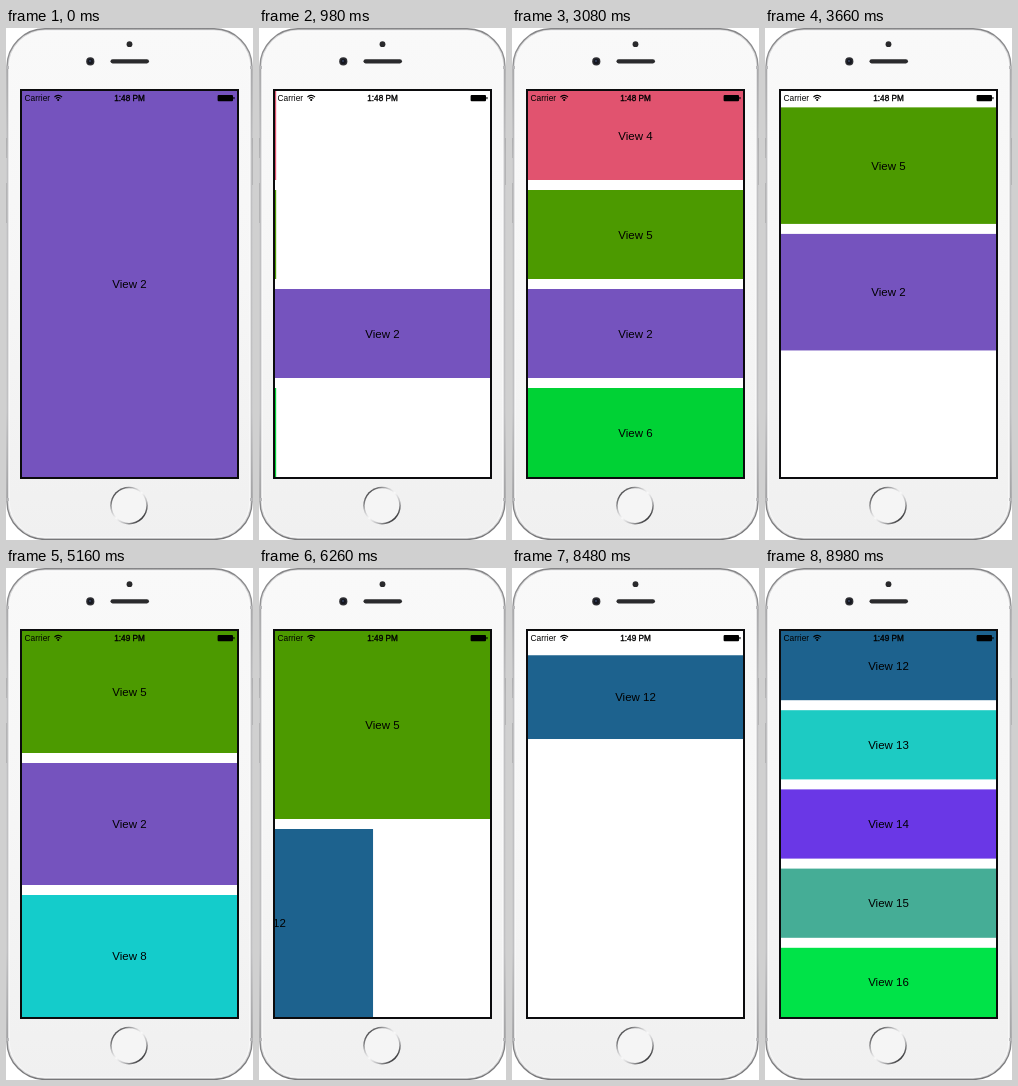
Write an HTML page with a canvas that moves like this. It is 247 px wide and 512 px high and loops after 9800 ms.

```html
<!DOCTYPE html>
<html lang="en">
<head>
<meta charset="utf-8">
<title>Stack view</title>
<style>
html, body { margin: 0; width: 100%; height: 100%; overflow: hidden; background: #fff; }
canvas { display: block; }
</style>
</head>
<body>
<canvas id="stage" width="247" height="512"></canvas>
<script>
const ctx = document.getElementById('stage').getContext('2d');
const LOOP = 9800;
const SCREEN = { x: 16, y: 63, w: 215, h: 386 };
const GAP = 10;
const STAGE = 400, MOVE_DELAY = 200, IN_DELAY = 600;
const FONT = '"Liberation Sans", Arial, sans-serif';

const COLORS = {
  2: '#7553be', 4: '#e1536f', 5: '#4c9a00', 6: '#00d235', 8: '#14cccb',
  12: '#1d628e', 13: '#1dcbc3', 14: '#6a37e6', 15: '#45ad96', 16: '#00e348'
};

// Each stack of views and the time its transition begins.
const STACKS = [
  { at: 0, views: [2] },
  { at: 360, views: [4, 5, 2, 6] },
  { at: 3176, views: [5, 2, 8] },
  { at: 5470, views: [5, 12] },
  { at: 7980, views: [12, 13, 14, 15, 16] }
];
const CLOCK_TICK = 4500;

const clamp = v => Math.max(0, Math.min(1, v));
const lerp = (a, b, p) => a + (b - a) * p;
function ease(v) {
  const t = clamp(v);
  return t < 0.5 ? 2 * t * t : 1 - 2 * (1 - t) * (1 - t);
}

function slot(views, id) {
  const n = views.length;
  const h = (SCREEN.h - GAP * (n - 1)) / n;
  return { y: SCREEN.y + views.indexOf(id) * (h + GAP), h };
}

function text(str, x, y, size, align = 'center') {
  ctx.font = `${size}px ${FONT}`;
  ctx.textAlign = align;
  ctx.textBaseline = 'alphabetic';
  ctx.fillStyle = '#000';
  ctx.fillText(str, x, y);
}

function panel(id, dx, y, h) {
  ctx.fillStyle = COLORS[id];
  ctx.fillRect(SCREEN.x + dx, y, SCREEN.w, h);
  text('View ' + id, SCREEN.x + SCREEN.w / 2 + dx, y + h / 2 + 4, 11.5);
}

function drawViews(t) {
  let i = STACKS.length - 1;
  while (i > 0 && t < STACKS[i].at) i--;
  const now = STACKS[i].views;
  const old = i ? STACKS[i - 1].views : now;
  const dt = t - STACKS[i].at;
  const out = ease(dt / STAGE);
  const move = ease((dt - MOVE_DELAY) / STAGE);
  const enter = ease((dt - IN_DELAY) / STAGE);

  for (const id of old.filter(v => !now.includes(v))) {
    const s = slot(old, id);
    if (out < 1) panel(id, -SCREEN.w * out, s.y, s.h);
  }
  for (const id of now) {
    const b = slot(now, id);
    if (old.includes(id)) {
      const a = slot(old, id);
      panel(id, 0, lerp(a.y, b.y, move), lerp(a.h, b.h, move));
    } else if (enter > 0) {
      panel(id, SCREEN.w * (enter - 1), b.y, b.h);
    }
  }
}

function drawStatus(t) {
  const clock = t < CLOCK_TICK ? '1:48 PM' : '1:49 PM';
  text('Carrier', 18.5, 73, 8.4, 'left');
  text(clock, 123.5, 73, 8.2);
  ctx.strokeStyle = '#000';
  ctx.lineWidth = 0.35;
  ctx.strokeText(clock, 123.5, 73);

  ctx.lineWidth = 1.1;
  for (const r of [3, 5.2]) {
    ctx.beginPath();
    ctx.arc(52.2, 72.6, r, -Math.PI * 0.76, -Math.PI * 0.24);
    ctx.stroke();
  }
  dot(52.2, 72, 1.1, '#000');

  box(211.6, 67, 15.4, 6.2, 1);
  ctx.fill();
  ctx.fillRect(227.4, 69, 1.1, 2.2);
}

function box(x, y, w, h, r) {
  ctx.beginPath();
  ctx.roundRect(x, y, w, h, r);
}

function dot(x, y, r, fill) {
  ctx.fillStyle = fill;
  ctx.beginPath();
  ctx.arc(x, y, r, 0, Math.PI * 2);
  ctx.fill();
}

function gradient(x0, y0, x1, y1, ...colors) {
  const g = ctx.createLinearGradient(x0, y0, x1, y1);
  colors.forEach((c, i) => g.addColorStop(i / (colors.length - 1), c));
  return g;
}

function drawPhone() {
  ctx.fillStyle = '#fff';
  ctx.fillRect(0, 0, 247, 512);

  // side buttons
  ctx.fillStyle = '#b4b4b4';
  ctx.fillRect(0, 110, 2, 20);
  ctx.fillRect(0, 155, 2, 40);
  ctx.fillRect(245, 110, 2, 47);

  box(1, 0.8, 245, 510.6, 38);
  ctx.fillStyle = '#dcdcdd';
  ctx.fill();
  ctx.strokeStyle = gradient(0, 0, 0, 512, '#858587', '#b4b4b6', '#b4b4b6', '#b4b4b6', '#777779');
  ctx.lineWidth = 1.4;
  ctx.stroke();
  box(3.2, 2.8, 240.6, 506.6, 36);
  ctx.fillStyle = gradient(0, 0, 0, 512, '#f9f9f9', '#f6f6f6', '#f0f0f0');
  ctx.fill();
  ctx.strokeStyle = '#fff';
  ctx.lineWidth = 0.8;
  ctx.stroke();

  // antenna bands
  ctx.fillStyle = '#b9b9bb';
  for (const y of [38, 470]) {
    ctx.fillRect(0.5, y, 2.5, 3);
    ctx.fillRect(244, y, 2.5, 3);
  }

  dot(123.5, 16.2, 2.9, '#29292b');
  dot(84.3, 33.4, 4.1, '#2e2e32');
  dot(84.3, 33.4, 2.6, '#15171f');
  dot(84, 33, 0.9, '#3d4a68');
  box(104.5, 31.2, 38.5, 4.2, 2.1);
  ctx.fillStyle = '#2b2b2d';
  ctx.fill();

  dot(123, 477.6, 18.8, gradient(109.5, 464, 136.5, 491, '#48484a', '#b8b8ba', '#fafafa', '#b8b8ba', '#333335'));
  dot(123, 477.6, 17.3, '#f5f5f5');

  ctx.fillStyle = '#0b0b0d';
  ctx.fillRect(14, 61, 219, 390);
  ctx.fillStyle = '#fff';
  ctx.fillRect(SCREEN.x, SCREEN.y, SCREEN.w, SCREEN.h);
}

function draw(t) {
  drawPhone();
  ctx.save();
  ctx.beginPath();
  ctx.rect(SCREEN.x, SCREEN.y, SCREEN.w, SCREEN.h);
  ctx.clip();
  drawViews(t);
  drawStatus(t);
  ctx.restore();
}

const start = performance.now();
function tick() {
  draw((performance.now() - start) % LOOP);
  requestAnimationFrame(tick);
}
tick();
</script>
</body>
</html>
```
